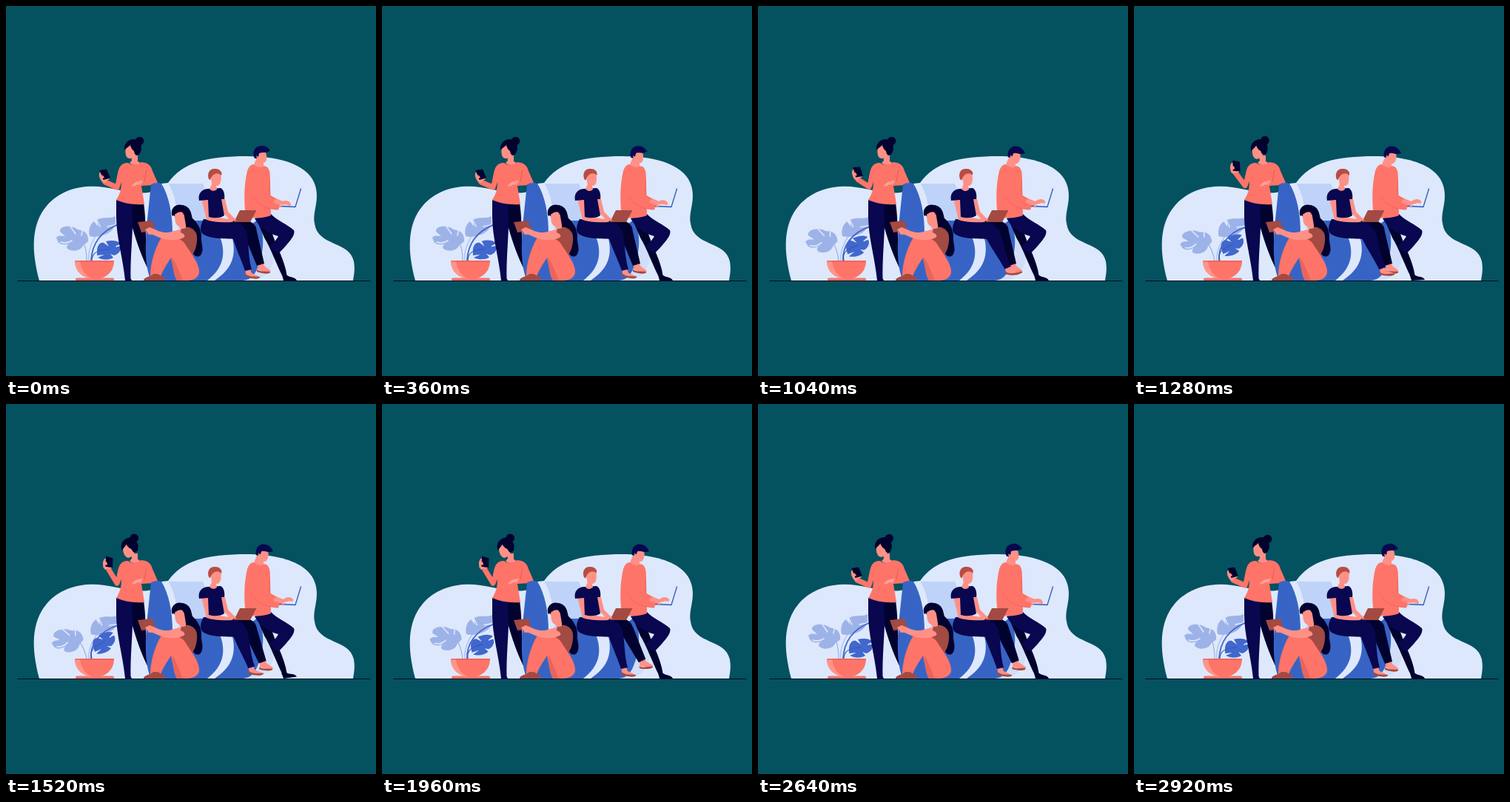
An HTML page that plays this animation: 500 by 500 pixels, repeating every 2960 ms.

```html
<!DOCTYPE html>
<html lang="en">
<head>
<meta charset="utf-8">
<title>People with devices</title>
<style>
html, body { margin: 0; width: 100%; height: 100%; overflow: hidden; background: #045160; }
svg { display: block; width: 100vw; height: 100vh; }
.pale { fill: #dde8fc; }
.mist { fill: #bfd2f8; }
.blue { fill: #3764c4; }
.leaf { fill: #9db3e8; }
.navy { fill: #08074f; }
.ink { fill: #02022f; }
.coral { fill: #ff7468; }
.skin { fill: #ff9086; }
.rust { fill: #a34a43; }
.line { fill: none; stroke-linecap: round; stroke-linejoin: round; }
.cut { stroke: #dde8fc; stroke-width: 1.6; }
</style>
</head>
<body>
<svg viewBox="0 0 500 500">
  <path class="pale" d="M45 371C34 330 34 295 55 270C75 247 105 241 133 245C165 250 195 262 219 239C239 211 272 203 325 203C375 203 411 217 418 243C424 264 414 277 417 294C421 325 464 317 470 345C472 357 470 364 469 371Z"/>

  <!-- plant -->
  <g id="midLeaf">
    <path class="leaf" d="M113 311C111 303 113 295 119 291L124 298L123 289C131 284 141 288 148 284C147 290 150 296 143 303C137 309 123 314 113 311Z"/>
    <path class="line cut" d="M123 290L127 298M147 296L137 298"/>
    <path class="line" d="M112 344C110 328 119 309 137 293" stroke="#9db3e8"/>
  </g>
  <g id="leftLeaf">
    <path class="line" d="M109 344C109 330 106 315 96 309" stroke="#9db3e8" stroke-width="1.3"/>
    <path class="leaf" d="M68 313C71 309 76 311 80 311L73 305C72 299 80 297 87 298C95 299 96 303 101 303C108 304 112 311 111 318C109 321 106 321 104 324C100 332 88 332 83 328C81 325 83 323 85 321C79 324 72 322 70 318Z"/>
    <path class="line cut" d="M74 319Q82 322 89 317M87 298L94 308M103 304L102 310"/>
  </g>
  <path id="stem" class="line" stroke="#4166c8" stroke-width="1.8"/>
  <g id="blueLeaf" fill="#4267cd">
    <path d="M123 331C123 324 127 319 132 320L139 325L135 318C143 316 151 317 155 321L149 325H155C156 331 151 336 146 337L141 335L145 340C139 344 130 343 124 340L133 336L123 337Z"/>
    <path class="line" d="M116 344C116 333 124 329 139 329" stroke="#3459b8" stroke-width="1.2"/>
    <path class="line cut" d="M149 325L154 323"/>
  </g>
  <rect x="94" y="367.500" width="52" height="4" rx="2" fill="#f9766a"/>
  <path class="coral" d="M93 344H146C146 360 134 369 120 369S93 360 93 344Z"/>
  <path d="M93 344H100C101 357 108 366 118 369C102 367 93 358 93 344Z" fill="#ff9588"/>
  <path class="line" d="M94 345H145" stroke="#d95b55"/>

  <!-- standing woman -->
  <path class="ink" d="M166 265L186 266C189 285 188 300 190 322L194 359C183 340 174 312 168 289Z"/>
  <path class="navy" d="M149 262L171 267C170 278 171 287 171 298C170 325 168 345 168.500 368L170 371H161C158 340 149 312 149 285Z"/>
  <path class="skin" d="M169 202H178V210L182 212C178 216 171 216 167 212L170 209Z"/>
  <path class="coral" d="M165 212C171 216 178 215 183 211C193 212 196 216 198 223L205 239C203 243 194 242 183 243L187 268C173 269 160 267 149 262C155 253 157 243 155 232L151 246C147 243 150 228 153 219C156 213 160 212 165 212Z"/>
  <path d="M190 222L187 237" class="line" stroke="#db5750" stroke-width=".8"/>
  <path d="M170 244C172 238 179 236 185 236L182 242C178 239 175 244 170 244Z" fill="#ffa095"/>
  <path id="forearm" class="line" stroke="#ff7468" stroke-width="7"/>
  <g id="phone">
    <path class="skin" d="M130 238C127 234 125 230 126 226C128 223 132 225 134 229L140 233C139 236 135 235 134 239Z"/>
    <path class="ink" d="M126.500 222L136 220.500L141 232.500L131.500 235Z"/>
    <path class="skin" d="M126 228L131 229L133 232L128 234Z"/>
  </g>
  <g id="womanHead">
    <path class="skin" d="M162 190C160 201 163 207 168 206L174 204L178 196V186Z"/>
    <path class="ink" d="M160 195C159 186 165 180 173 180C183 181 185 193 181 199C179 202 176 202 174 200L173 196C170 194 168 190 168 187C166 191 163 191 160 195Z"/>
    <circle class="ink" cx="180.500" cy="182.500" r="5.800"/>
  </g>

  <!-- backpack -->
  <path class="mist" d="M217 240H266L275 262L300 300V320H230Z"/>
  <path fill="#d0defa" d="M336 300L345 290C357 300 363 320 362 341C360 355 351 367 336 371H270V330Z"/>
  <path class="blue" d="M196 241C204 237 213 239 217 246C228 265 231 290 234 310L240 371H196C187 351 188 320 191 288Z"/>
  <path class="pale" d="M210 240L219 239C227 252 232 270 234 306L225 308C225 280 220 256 210 240Z"/>
  <path class="blue" d="M252 290H278L292 315C298 333 296 353 273 371H235Z"/>
  <path class="pale" d="M290 314L307 315C311 332 309 347 301 356L282 371H272C294 354 297 335 290 314Z"/>
  <path class="blue" d="M306 314L340 289C349 302 350 330 341 351C337 363 331 370 320 371H282C303 357 312 340 306 314Z"/>

  <!-- man -->
  <path class="ink" d="M338 287L356 291C359 315 373 334 378 356L380 366H374C365 348 358 328 349 313Z"/>
  <path id="shoe" class="ink" d="M373 363L380 364C384 367 391 366 393 371H375Z"/>
  <path class="navy" d="M336 287L358 281C366 290 382 296 389 303C392 310 381 321 369 334C364 333 359 329 356 324C363 319 366 315 368 311C356 308 344 302 336 287Z"/>
  <path class="skin" d="M339 205L348 208V216C344 220 337 218 335 214Z"/>
  <path class="coral" d="M335 214C339 218 345 219 348 216L352 217C357 220 357 228 357 237L358 283C348 287 335 288 324 284C321 261 322 240 326 223C328 217 331 214 335 214Z"/>
  <path class="coral" d="M357 256L373 264L370 272L354 273Z"/>
  <path class="skin" d="M363 260L375 264L372 271L361 268Z"/>
  <path class="coral" d="M338 228C333 241 335 263 340 267C350 273 360 275 368 275L370 269L353 263L355 232Z"/>
  <path d="M356 235V255L364 262M334 258C339 270 355 275 368 275" class="line" stroke="#e35f59" stroke-width=".7"/>
  <path class="line" d="M370 270.500L391 271.500L398.500 247" stroke="#2f58bc" stroke-width="1.300"/>
  <g id="hand">
    <path class="skin" d="M369 267C373 263 378 262 382 264C385 266 386 269 384 270L374 269L369 273Z"/>
    <path class="line" d="M371 269H381" stroke="#dde8fc" stroke-width=".8"/>
  </g>
  <g id="manHead">
    <path class="skin" d="M338 197L351 198C354 206 352 213 346 212L339 210Z"/>
    <path class="navy" d="M336 206C332 198 336 189 345 189C350 188 354 192 357 195C354 199 347 197 342 199L341 204L338 202L339 206Z"/>
  </g>

  <!-- woman on the backpack -->
  <path class="ink" d="M305 290C322 288 337 290 338.500 302L336 314L322 310Z"/>
  <g id="backLeg">
    <path class="skin" d="M340 345L347 344L349 351L358 358L353 361L340 356Z"/>
    <path class="rust" d="M339 356C344 360 351 358 357 359C358 362 350 363 339 359Z"/>
    <path class="ink" d="M320 294C332 291 337 296 339 305L349 348L339 351L322 310Z"/>
  </g>
  <g id="frontLeg">
    <path class="skin" d="M323 354L329 353L332 361L343 366L338 369L324 363Z"/>
    <path class="rust" d="M323 361C328 367 336 365 343 366C344 369 334 370 323 365Z"/>
    <path class="navy" d="M304 296C318 294 325 300 326 310C328 327 328 342 332 356L323 358C318 342 311 329 306 312Z"/>
  </g>
  <path class="navy" d="M267 288L300 290C314 291 324 296 326 309L309 315C294 314 273 315 265 307C261 302 264 293 267 288Z"/>
  <path class="skin" d="M264 260L274 260L276 284L308 289L306 292C290 293 276 291 271 289Z"/>
  <path class="skin" d="M290 257L296 261L300 278L310 288L305 291L294 280Z"/>
  <path class="navy" d="M274 247L290 246C295 248 296 257 295 261L291 261L295 283C290 287 281 287 274 285L273 262L261 263C259 254 264 247 274 247Z"/>
  <path class="rust" d="M308 292L316 276H338.500L330 292Z"/>
  <path class="skin" d="M300 287L308 287L312 290L304 291Z"/>
  <g id="sitHead">
    <path class="skin" d="M276 225H290C292 235 290 244 284 243L285 248C281 251 277 250 275 247L278 241Z"/>
    <path d="M274 234C271 225 276 219 283 220C289 220 293 225 291 229C285 223 278 228 276 235Z" fill="#b64d43"/>
  </g>

  <!-- woman on the floor -->
  <path class="ink" d="M224 280C224 271 231 267 238 269C250 271 250 280 252 287C258 292 264 301 264 311C263 320 268 328 264 335C261 341 254 339 252 333L244 302Z"/>
  <path class="rust" d="M238 299C248 297 257 302 258 311C259 322 255 334 248 342L232 320Z"/>
  <path class="coral" d="M210 313C221 308 232 312 232 320C227 338 214 351 209 365H195C195 349 201 327 210 313Z"/>
  <path class="coral" d="M216 322C226 311 238 312 244 325C253 338 262 350 261 361C259 371 246 372 231 371C226 363 226 350 222 338Z"/>
  <path d="M223 339C230 345 234 360 239 371H231C226 363 226 350 223 339Z" fill="#e6655d"/>
  <path class="rust" d="M186 371C186 366 196 366 199 362H205L212 366L214 364V371Z"/>
  <path class="skin" d="M246 301C250 307 241 315 230 316C217 318 204 312 192 306L195 301L213 306C224 307 233 300 246 301Z"/>
  <path class="rust" d="M237 300C244 296 251 302 250 309L240 315C243 310 241 308 236 306Z"/>
  <path class="rust" d="M178 292L198 290L202 304L183 306Z"/>
  <path class="skin" d="M188 302L194 299L204 303L207 308L193 309Z"/>
  <path class="skin" d="M228 279L240 278L243 296L243 300C239 302 234 301 235 298C229 297 228 291 228 279Z"/>
  <path class="ink" d="M225 284C221 275 228 268 238 269C248 271 249 280 250 286L251 298C245 298 243 292 242 284L236 276C233 279 230 280 225 284Z"/>

  <path class="line" d="M16 371.500H492" stroke="#020820"/>
</svg>
<script>
const LOOP = 2960, STEP = 40;
const $ = id => document.getElementById(id);
const mix = (a, b, k) => a + (b - a) * k;

function ease(t, from, to) {
  const k = Math.min(1, Math.max(0, (t - from) / (to - from)));
  return k * k * (3 - 2 * k);
}

// Rises over a..b, holds, then falls over c..d.
const pulse = (t, a, b, c, d) => ease(t, a, b) - ease(t, c, d);

function pose(id, angle, x, y, dx = 0, dy = 0) {
  $(id).setAttribute('transform', `translate(${dx} ${dy}) rotate(${angle} ${x} ${y})`);
}

function draw(t) {
  const sway = pulse(t, 500, 1500, 1500, 2440);
  const curl = pulse(t, 200, 1500, 1500, 2500);
  pose('leftLeaf', -14 * sway, 108, 344);
  pose('midLeaf', 3 * sway, 114, 344);
  pose('blueLeaf', -20 * curl, 116, 344);
  $('stem').setAttribute('d',
    `M115 344C${mix(116, 113, curl)} 325 ${mix(124, 127, curl)} 306 152 ${mix(295, 299, curl)}`);

  const lift = pulse(t, 850, 1450, 2150, 2650);
  pose('phone', 24 * lift, 133, 227, 6 * lift, -14 * lift);
  $('forearm').setAttribute('d',
    `M${mix(134, 139, lift)} ${mix(238, 224, lift)}L150 ${mix(245, 242, lift)}L155 229`);
  pose('womanHead', -15 * pulse(t, 1060, 1500, 2400, 2860), 172, 209);

  const nod = pulse(t, 150, 650, 1960, 2360);
  pose('manHead', 14 * nod, 344, 213);
  pose('hand', -14 * nod, 370, 270, 4 * nod, 0);
  pose('shoe', -8 * pulse(t, 1100, 1500, 1500, 1900), 375, 370);

  pose('frontLeg', -10.5 * pulse(t, 200, 1040, 1040, 1900), 315, 300);
  pose('backLeg', -8.5 * pulse(t, 1250, 1920, 2400, 2880), 331, 297);
  pose('sitHead', -5 * Math.sin(2 * Math.PI * t / LOOP) ** 2, 283, 247);
}

function frame(now) {
  draw(Math.floor(now % LOOP / STEP) * STEP);
  requestAnimationFrame(frame);
}
requestAnimationFrame(frame);
</script>
</body>
</html>
```
